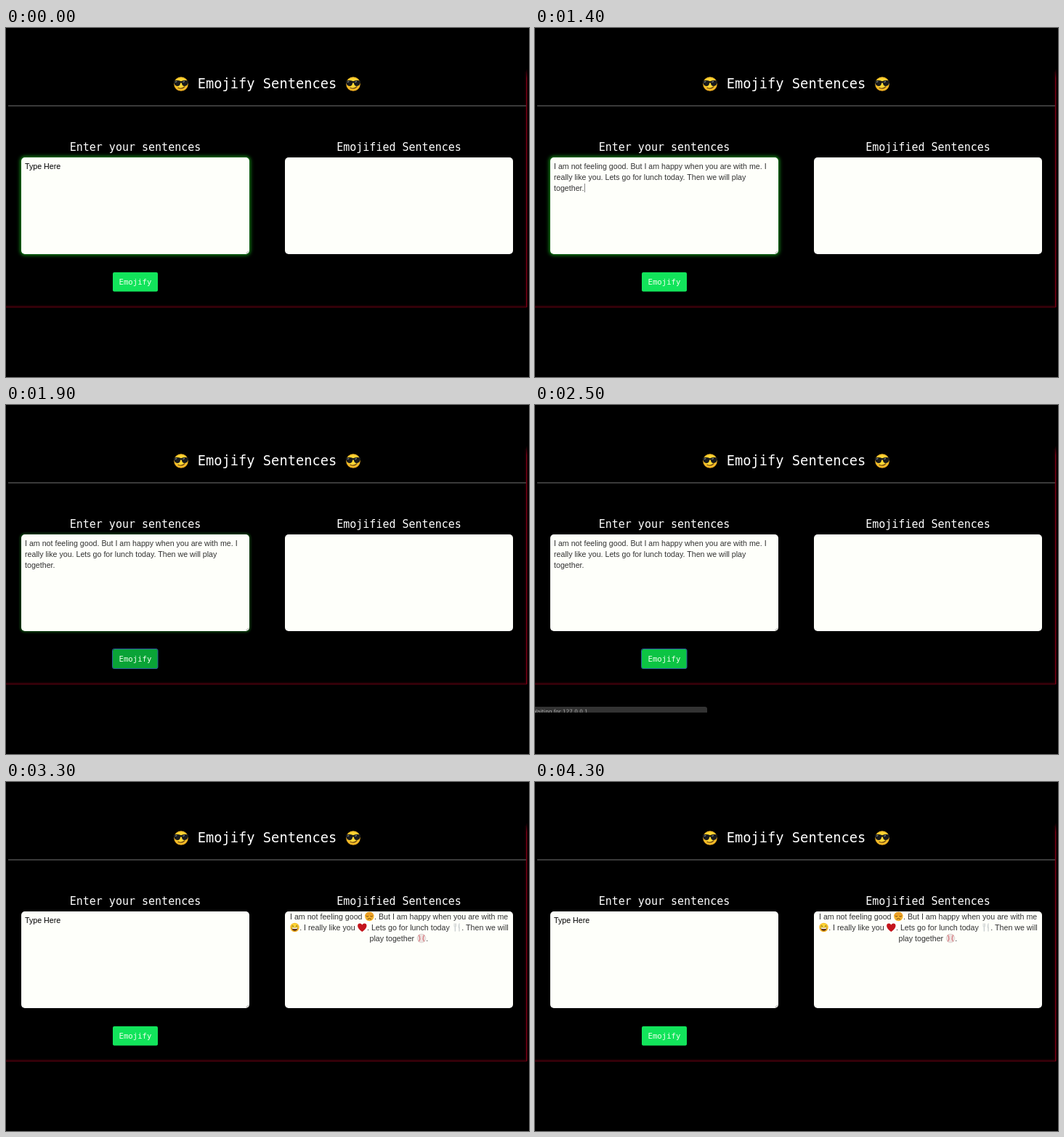
An HTML page that plays this animation: 720x480 px, repeating every 4.7 s.

```html
<!DOCTYPE html>
<html lang="en">
<head>
<meta charset="utf-8">
<title>Emojify Sentences</title>
<style>
  html, body { margin: 0; width: 100%; height: 100%; overflow: hidden; background: #000; }
  svg { display: block; width: 720px; height: 480px; }
  text { white-space: pre; }
  .mono { font-family: "DejaVu Sans Mono", monospace; fill: #fff; text-anchor: middle; }
  .sans { font: 10.667px "Liberation Sans", Arial, sans-serif; fill: #333; }
  .status { font: 7.3px "DejaVu Sans", sans-serif; fill: #aaa; }
</style>
</head>
<body>
<svg viewBox="0 0 720 480">
  <defs>
    <radialGradient id="skin" cy=".45" r=".55">
      <stop offset=".5" stop-color="#fdd835"/><stop offset="1" stop-color="#f2a91e"/>
    </radialGradient>
    <linearGradient id="edge" x2="0" y2="1">
      <stop stop-color="#780014" stop-opacity="0"/><stop offset=".04" stop-color="#780014"/>
    </linearGradient>
    <clipPath id="bar"><path d="M0 415H234q3 0 3 3V423H0z"/></clipPath>
    <g id="cool">
      <circle r="9.8" fill="url(#skin)"/>
      <path d="M-4 5.2Q1 7.6 5 3.8" fill="none" stroke="#6b4410" stroke-width="1.2" stroke-linecap="round"/>
      <path d="M-10.5-4.2Q-5-6 0-3.8Q5-6 10.5-4.2L10-2.4Q9 3 5 3Q1.6 3 .8-1.6H-.8Q-1.6 3-5 3Q-9 3-10-2.4z" fill="#17191b"/>
      <path d="M-8.2-2.6L-5.6-3.4M2.4-2.6L5-3.4" stroke="#9aa4a8"/>
    </g>
    <g id="sad">
      <circle r="6.2" fill="#f4b22c"/>
      <path d="M-6.1-1Q-5-6.2 0-6.2T6.1-1z" fill="#eea026"/>
      <path d="M-4.5-.6Q-3 .8-1.2-.4M1.2-.4Q3 .8 4.5-.6M-2.6 3.8Q0 1.6 2.6 3.8" fill="none" stroke="#71430f"/>
    </g>
    <g id="grin">
      <circle r="6.2" fill="url(#skin)"/>
      <path d="M-4-1.2Q-2.7-3.4-1.4-1.2M1.4-1.2Q2.7-3.4 4-1.2" fill="none" stroke="#513512" stroke-width=".9"/>
      <path d="M-4.2.6H4.2Q3.6 4.8 0 4.8T-4.2.6z" fill="#5d2d12"/>
      <path d="M-3.7.6H3.7L3.2 2H-3.2z" fill="#fff"/>
    </g>
    <path id="heart" d="M0 6Q-6.2 1.6-6.2-2.3Q-6-5.6-3.1-5.6Q-1-5.6 0-3.6Q1-5.6 3.1-5.6Q6-5.6 6.2-2.3Q6.2 1.6 0 6z" fill="#c4151c"/>
    <g id="cutlery" fill="none" stroke="#c3c9cb">
      <path d="M-4-5.5V-2Q-4-.6-2.7-.6T-1.4-2V-5.5M-2.7-5.5V-.6" stroke-width=".7"/>
      <path d="M-2.7-.6V5.5M3 0V5.5" stroke-width="1.2"/>
      <path d="M3.2.4H2Q1.6-4 3.2-5.6z" fill="#d6dadb" stroke-width=".5"/>
    </g>
    <g id="ball" fill="none">
      <circle r="5.9" fill="#eee6e4" stroke="#cfc4c2" stroke-width=".6"/>
      <path d="M-3.6-4.5Q-.6 0-3.6 4.5M3.6-4.5Q.6 0 3.6 4.5" stroke="#d0535b" stroke-width=".8"/>
      <path d="M-3.6-4.5Q-.6 0-3.6 4.5M3.6-4.5Q.6 0 3.6 4.5" stroke="#d98a8e" stroke-width="2.4" stroke-dasharray=".6 1.3"/>
    </g>
  </defs>

  <rect width="720" height="480"/>
  <g fill="#780014">
    <rect x="716" y="56" width="1.5" height="328" fill="url(#edge)"/>
    <rect x="714" y="60" width="2" height="322" opacity=".12"/>
    <rect y="383" width="717" height="1.5" opacity=".65"/>
    <rect y="381" width="716" height="2" opacity=".18"/>
  </g>

  <use href="#cool" x="241" y="77"/>
  <use href="#cool" x="478" y="77"/>
  <text class="mono" x="359.5" y="83" font-size="18.72">Emojify Sentences</text>
  <rect x="3" y="106" width="713" height="2" fill="#3a3a3a"/>
  <text class="mono" x="178" y="169" font-size="15">Enter your sentences</text>
  <text class="mono" x="541" y="169" font-size="15">Emojified Sentences</text>

  <g id="glow">
    <rect id="halo" x="19.5" y="176.5" width="317" height="136" rx="6" fill="#0a8c12"/>
    <rect x="20.5" y="177.5" width="315" height="134" rx="5.5" fill="none" stroke="#0b5c10"/>
  </g>
  <g fill="#fefffa">
    <rect x="21" y="178" width="314" height="133" rx="5"/>
    <rect x="384" y="178" width="314" height="133" rx="5"/>
  </g>
  <path d="M330.5 310L334 306.5M332.5 310L334 308.5" stroke="#777" stroke-width=".6"/>

  <text class="sans" id="hint" x="26" y="194" style="fill:#000">Type Here</text>
  <g class="sans" id="typed">
    <text x="26" y="194">I am not feeling good. But I am happy when you are with me. I</text>
    <text x="26" y="209">really like you. Lets go for lunch today. Then we will play</text>
    <text x="26" y="224">together.</text>
  </g>
  <rect id="caret" x="68" y="214" width="1" height="12" fill="#888"/>

  <g class="sans" id="result">
    <text x="391" y="189">I am not feeling good</text>
    <use href="#sad" x="500.3" y="185"/>
    <text x="507" y="189">. But I am happy when you are with me</text>
    <use href="#grin" x="397.5" y="200"/>
    <text x="404.2" y="204">. I really like you</text>
    <use href="#heart" x="490.3" y="200"/>
    <text x="497" y="204">. Lets go for lunch today</text>
    <use href="#cutlery" x="621" y="200"/>
    <text x="627.3" y="204">. Then we will</text>
    <text x="500.5" y="219">play together</text>
    <use href="#ball" x="572" y="215"/>
    <text x="578.3" y="219">.</text>
  </g>

  <rect id="button" x="147" y="336" width="62" height="26.5" rx="2"/>
  <rect id="ring" x="146.5" y="335.5" width="62.5" height="27" rx="2" fill="none" stroke="#2b5f9e"/>
  <text class="mono" x="178" y="353" font-size="10.667" style="fill:#eaffea">Emojify</text>

  <g id="status" clip-path="url(#bar)">
    <rect y="415" width="237" height="8" fill="#333"/>
    <text class="status" x="-4" y="424">Waiting for 127.0.0.1...</text>
  </g>
</svg>
<script>
const $ = id => document.getElementById(id);
const show = (id, on) => $(id).style.opacity = Number(on);
const within = (t, a, b) => t >= a && t < b;
// value of the last [time, value] pair already reached
const pick = (t, keys) => keys.filter(k => k[0] <= t).pop()[1];

const REST = '#12e45b', MID = '#10d450', HOVER = '#0cc444', DOWN = '#0aa337';
const fills = [[0, REST], [1600, MID], [1700, HOVER], [1900, DOWN], [2000, '#0bb43e'],
  [2100, HOVER], [2900, REST], [3500, MID], [3600, HOVER], [3700, MID], [3800, REST]];
const glows = [[0, 1], [1900, .55], [2000, .25], [2100, 0]];
const bars = [[0, 0], [2500, 1], [3100, .67], [3200, .33], [3300, 0]];

function draw(now) {
  const t = now % 4700, glow = pick(t, glows);
  show('hint', t < 400 || t >= 2900);
  show('typed', within(t, 400, 2900));
  show('caret', within(t, 400, 800) || within(t, 1400, 1700));
  show('result', t >= 2900);
  show('ring', within(t, 1900, 2900));
  show('status', pick(t, bars));
  show('glow', glow);
  $('halo').style.filter = `blur(${glow * 2.6}px)`;
  $('button').style.fill = pick(t, fills);
}

let start;
function tick(now) {
  start ??= now;
  draw(now - start);
  requestAnimationFrame(tick);
}
draw(0);
requestAnimationFrame(tick);
</script>
</body>
</html>
```
